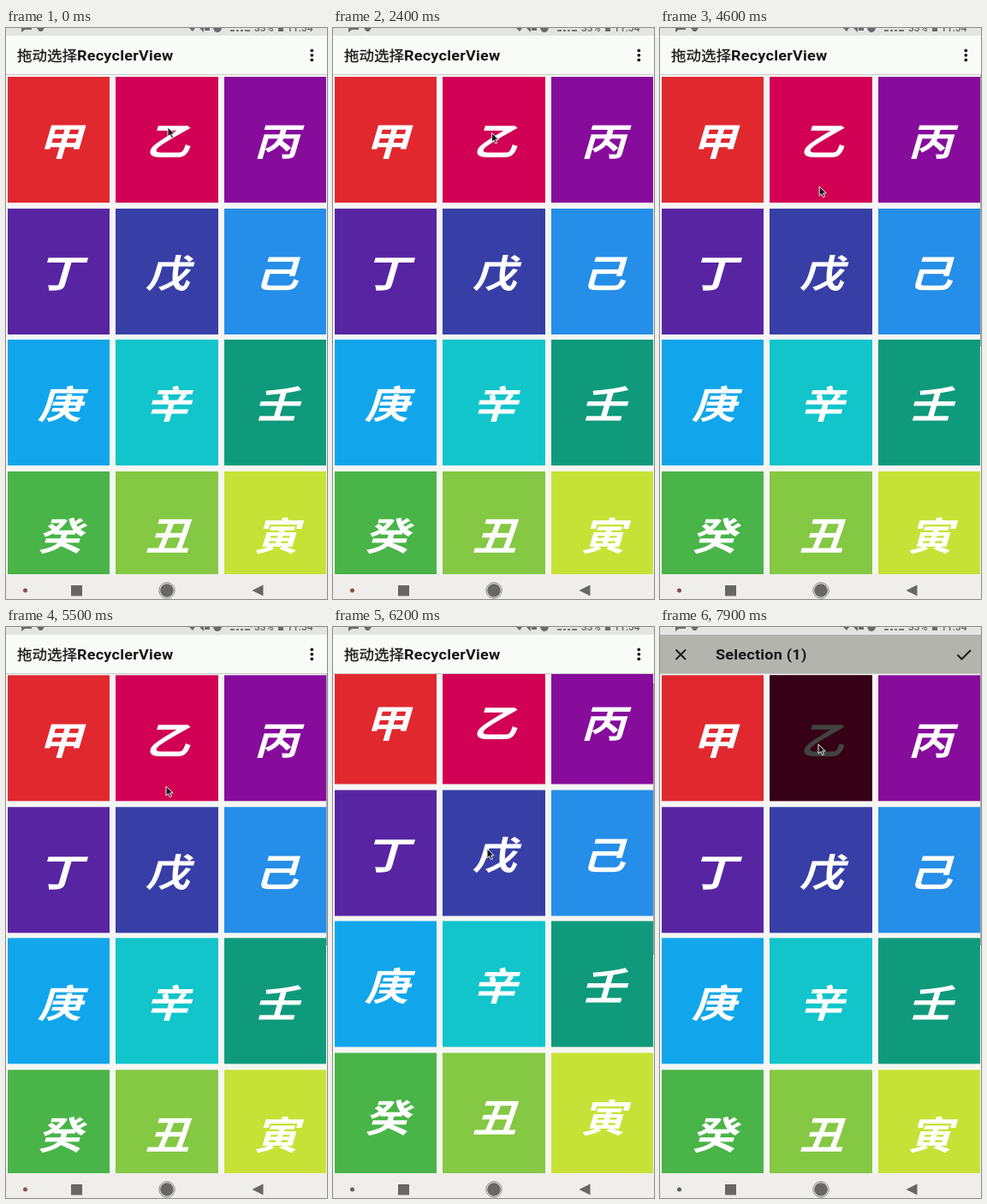
These frames come from a looping animation (375x667 px, 8000 ms). An HTML page:

```html
<!DOCTYPE html>
<html lang="zh">
<head>
<meta charset="utf-8">
<style>
  html, body { margin: 0; width: 100%; height: 100%; overflow: hidden; }
  #stage { position: absolute; left: 0; top: 0; width: 375px; height: 667px; overflow: hidden; background: #f5f6f3; }
  #list { position: absolute; left: 0; top: 55px; width: 375px; height: 583px; overflow: hidden; }
  #grid { position: absolute; left: 0; top: 0; }
  .tile {
    position: absolute; width: 119.5px; height: 147px; color: #fff; text-align: center;
    font: italic 700 52px/147px "Noto Sans CJK SC", "Noto Sans CJK", sans-serif;
  }
  .tile b { display: block; transform: translate(1px, -.5px) scaleY(.86); }
  #shade { position: absolute; inset: 0; background: rgba(0,0,0,.74); }
  #thumb { position: absolute; right: 0; width: 1.5px; height: 317px; background: rgba(60,60,60,.4); }
  .bar {
    position: absolute; left: 0; top: 9px; width: 375px; height: 45px; background: #f9fbf8; color: #181818;
    font: 700 18px/46px Roboto, "Noto Sans CJK SC", "Noto Sans CJK", sans-serif; letter-spacing: .25px;
    white-space: nowrap;
  }
  .bar span { position: absolute; top: 0; transform: scaleY(.92); }
  .bar .zh { font-size: 17.5px; font-weight: 500; letter-spacing: 0; -webkit-text-stroke: .3px #181818; }
  #line { position: absolute; top: 53.5px; width: 375px; height: 1.5px; background: #c6c8c5; }
  #mode { background: #b3b4ae; }
  #status {
    position: absolute; left: 0; top: 0; width: 375px; height: 9px; overflow: hidden; background: #e4e5e2; color: #666;
    font: 500 12px/14px Roboto, sans-serif;
  }
  #status span { position: absolute; top: -7px; }
  #nav { position: absolute; left: 0; top: 638px; width: 375px; height: 29px; background: #efeeea; }
  svg { position: absolute; left: 0; top: 0; overflow: visible; }
</style>
</head>
<body>
<div id="stage">
  <div id="list"><div id="grid"></div><div id="thumb"></div></div>
  <div class="bar">
    <span class="zh" style="left:13px">拖动选择</span><span style="left:83px">RecyclerView</span>
    <svg width="375" height="45" fill="#1c1c1c">
      <circle cx="357.3" cy="17.3" r="1.9"/><circle cx="357.3" cy="22.8" r="1.9"/><circle cx="357.3" cy="28.3" r="1.9"/>
    </svg>
  </div>
  <div id="line"></div>
  <div class="bar" id="mode">
    <span style="left:65px">Selection (1)</span>
    <svg width="375" height="45" fill="none" stroke="#1c1c1c" stroke-width="2">
      <path d="M18.5 17.5l11.5 11.5m0-11.5l-11.5 11.5M347.5 23.5l5 5 10.5-10.5"/>
    </svg>
  </div>
  <div id="status">
    <span style="left:290px">33%</span><span style="left:328px">11:54</span>
    <svg width="375" height="9" fill="#6a6a6a">
      <path d="M18 0h12v2h-8l-4 3zM36 0h9l-3 4h-3zM214 0l4 4 3-4zM226 0h5v5zM232 0h6v3h-6zM242 0h10q-1 5-5 5t-5-5zM318 0h6v4h-6z"/>
      <path d="M262 3h5m2 0h3m2 0h3m2 0h6" stroke="#777" stroke-width="2"/>
    </svg>
  </div>
  <div id="nav">
    <svg width="375" height="29" fill="#696765">
      <circle id="dot" cx="22.5" cy="19" r="2.5"/>
      <rect x="76" y="13" width="13" height="12.5"/>
      <circle cx="188" cy="19" r="9.2" fill="none" stroke="#858381" stroke-width="1"/>
      <circle cx="188" cy="19" r="7.8"/>
      <path d="M287.500 19l13-6.500v13z"/>
    </svg>
  </div>
  <svg id="cursor" width="10" height="14">
    <path d="M0 0v11l2.600-2.300 1.900 4 2-1-1.900-3.800h3.600z" fill="#161616" stroke="#eee" stroke-width="1"/>
  </svg>
</div>
<script>
const $ = id => document.getElementById(id);
const LOOP = 8000, STEP = 100, ROW = 153.5, COL = 126.5;
const signs = '甲乙丙丁戊己庚辛壬癸丑寅卯辰巳午未申酉戌亥';
const colors = ['#e1282f', '#d10054', '#870c9c', '#5825a2', '#373fa6', '#258ee8', '#11a6eb', '#11c5cb', '#0f9a7c',
  '#49b447', '#84c843', '#c7e236', '#fde83a', '#fdc010', '#fb980c'];

[...signs].forEach((sign, i) => {
  const tile = document.createElement('div');
  tile.className = 'tile';
  tile.innerHTML = `<b>${sign}</b>` + (i === 1 ? '<div id="shade"></div>' : '');
  tile.style.left = 1.8 + i % 3 * COL + 'px';
  tile.style.top = 2.3 + Math.floor(i / 3) * ROW + 'px';
  tile.style.background = colors[i % colors.length];
  $('grid').append(tile);
});

// Rows of [ms, value, ...]
const pointer = [[0, 189, 116], [1800, 186, 121], [2700, 185, 123], [3600, 186, 185], [3700, 186, 185],
  [4100, 186, 125], [4500, 186, 185], [5500, 187, 186], [5900, 181, 279], [6100, 181, 279],
  [6200, 180, 259], [6500, 182, 180], [6900, 184, 279], [7300, 185, 137], [LOOP, 185, 137]];
const scroll = [[0, 0], [3700, 0], [4100, 60], [4500, 0], [4700, 0], [4800, .7], [6100, .7],
  [6200, 20.5], [6500, 100], [6900, .7], [LOOP, .7]];
const modeFade = [[0, 0], [7600, 0], [7800, 1], [LOOP, 1]];

function at(keys, t) {
  const i = keys.findIndex(k => k[0] > t);
  const [a, b] = [keys[i - 1], keys[i]];
  const p = (t - a[0]) / (b[0] - a[0]);
  return a.slice(1).map((v, n) => v + (b[n + 1] - v) * p);
}

function draw(now) {
  const t = Math.floor(now % LOOP / STEP) * STEP;
  const [x, y] = at(pointer, t);
  const [top] = at(scroll, t);
  $('cursor').style.transform = `translate(${x}px, ${y}px)`;
  $('grid').style.transform = `translateY(${-top}px)`;
  $('thumb').style.top = top * .54 + 'px';
  $('thumb').style.opacity = t < 3700 ? 0 : 1;
  $('mode').style.opacity = at(modeFade, t)[0];
  $('shade').style.opacity = t < 7700 ? 0 : 1;
  $('dot').setAttribute('fill', t < 5900 ? '#8d5046' : '#5f5f64');
}

const start = performance.now();
function tick() {
  draw(performance.now() - start);
  requestAnimationFrame(tick);
}
tick();
</script>
</body>
</html>
```
